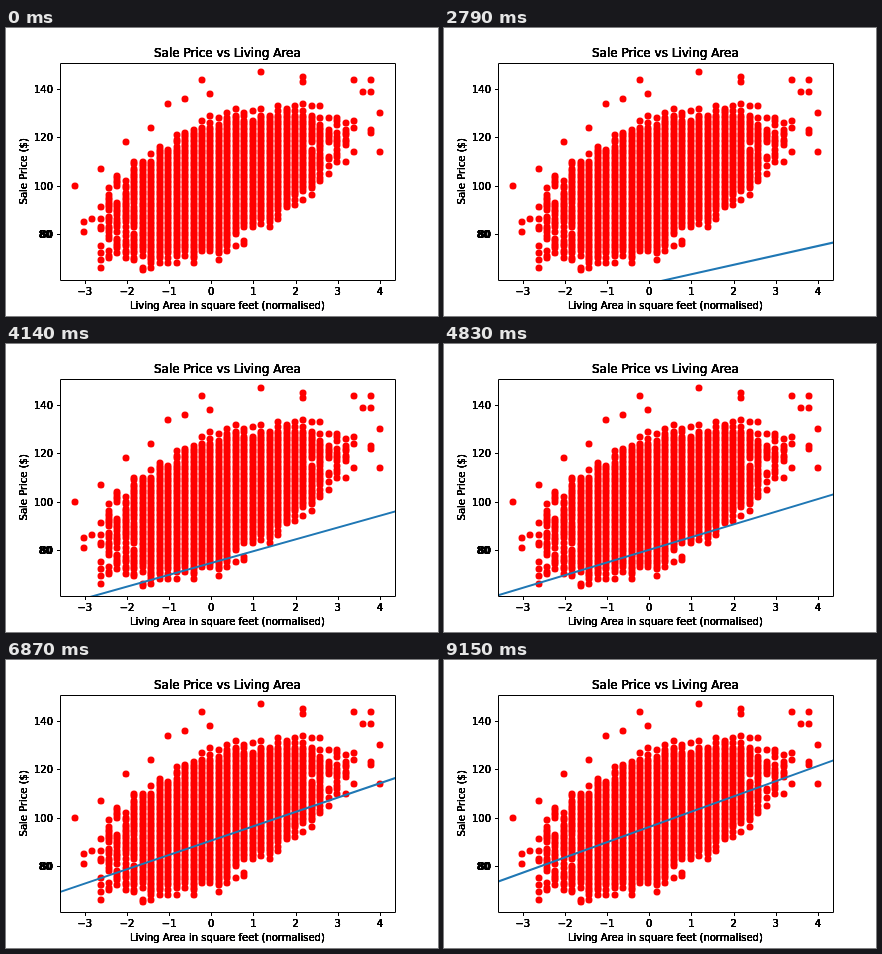
These frames come from a looping animation (432 by 288 pixels, 9.18 s). An HTML page:

```html
<!DOCTYPE html>
<html lang="en">
<head>
<meta charset="utf-8">
<title>Regression fit</title>
<style>
  html, body { margin: 0; width: 100%; height: 100%; overflow: hidden; background: #fff; }
  svg { display: block; width: 100%; height: 100%; }
  text { font-family: "DejaVu Sans", sans-serif; }
</style>
</head>
<body>
<svg id="chart" viewBox="0 0 432 288">
  <clipPath id="plot"><rect x="54" y="35" width="335" height="217"/></clipPath>
</svg>
<script>
const svg = document.getElementById("chart");
const LOOP = 9180, STEP = 30, FIRST_VISIBLE = 2010;
const LEFT = 54, RIGHT = 388.8;

const priceY = price => 242.1 - 2.411 * (price - 65);
const areaX = area => 205.3 + 42.15 * area;
const snap = v => Math.round(v) + 0.5;

function add(tag, attrs, text) {
  const el = document.createElementNS("http://www.w3.org/2000/svg", tag);
  for (const key in attrs) el.setAttribute(key, attrs[key]);
  if (text) el.textContent = text;
  svg.appendChild(el);
  return el;
}

// Stacked copies give the heavy, hard-edged lettering.
function label(text, x, y, { anchor = "middle", size = 10, ...attrs } = {}) {
  for (let i = 0; i < 6; i++) {
    add("text", { x, y, "text-anchor": anchor, "font-size": size, ...attrs }, text);
  }
}

let seed = 7;
function random() {
  seed = (seed * 16807) % 2147483647;
  return seed / 2147483647;
}

// Areas lie in 37 evenly spaced columns; prices are whole numbers.
const COLUMNS = 37;
const columnX = column => 69.2 + 8.455 * column;
const lowEdge = area => 74 + 6 * area + 2 * area * area;
const highEdge = area => 126 + 6.2 * area - 1.9 * area * area;

function dot(column, price) {
  add("circle", {
    cx: Math.round(columnX(column)), cy: Math.round(priceY(price)), r: 3.5, fill: "#f00"
  });
}

// Dense inside the two curves, thinning out across them and at both ends.
function drawCloud() {
  for (let column = 3; column < COLUMNS - 4; column++) {
    const area = (columnX(column) - 205.3) / 42.15;
    const low = lowEdge(area), high = highEdge(area);
    const density = Math.min(1, 0.4 + 0.7 * (2.9 - Math.abs(area - 0.3)));
    for (let price = Math.ceil(low - 4); price <= high + 4; price++) {
      const depth = Math.min(price - low, high - price);
      if (random() < density * Math.min(1, 0.6 + 0.13 * depth)) dot(column, price);
    }
  }
}

function drawOutliers() {
  const outliers = [
    [0, 100], [1, 81], [1, 85], [2, 86], [3, 66], [3, 107], [6, 118], [8, 65],
    [9, 124], [11, 134], [13, 136], [15, 144], [16, 138], [17, 69], [22, 147],
    [27, 145], [27, 143], [33, 144], [33, 127], [33, 124], [33, 114], [34, 139],
    [35, 144], [35, 139], [35, 123], [35, 122], [36, 130], [36, 114]
  ];
  outliers.forEach(([column, price]) => dot(column, price));
}

function drawAxes() {
  let d = "M54.5 35.5H389.5V252.5H54.5Z";
  for (let area = -3; area <= 4; area++) {
    const x = areaX(area);
    d += `M${snap(x)} 252.5v3.5`;
    label(String(area).replace("-", "\u2212"), x, 266.6);
  }
  for (let price = 80; price <= 140; price += 20) {
    const y = priceY(price);
    d += `M54.5 ${snap(y)}h-3.5`;
    label(String(price), 47, y + 3.8, { anchor: "end" });
  }
  label("80", 45.5, priceY(80) + 3.8, { anchor: "end" });
  add("path", { d, fill: "none", stroke: "#000", "stroke-width": 1 });
  label("Sale Price vs Living Area", 221.4, 28.6, { size: 12 });
  label("Living Area in square feet (normalised)", 221.4, 280.5);
  label("Sale Price ($)", 0, 0, { transform: "translate(21 143.3) rotate(-90)" });
}

drawCloud();
drawOutliers();
const fit = add("line", {
  x1: LEFT, x2: RIGHT, stroke: "#1f77b4", "stroke-width": 2,
  "stroke-linecap": "square", "clip-path": "url(#plot)"
});
drawAxes();

// Gradient descent from zero with rate 0.01: the error shrinks by 1% per step.
function render(time) {
  const step = Math.floor((time % LOOP) / STEP);
  const progress = 1 - Math.pow(0.99, step - 5);
  fit.setAttribute("visibility", step * STEP < FIRST_VISIBLE ? "hidden" : "visible");
  fit.setAttribute("y1", priceY(77.3 * progress));
  fit.setAttribute("y2", priceY(130.1 * progress));
}

const start = performance.now();
function tick() {
  render(performance.now() - start);
  requestAnimationFrame(tick);
}
tick();
</script>
</body>
</html>
```
